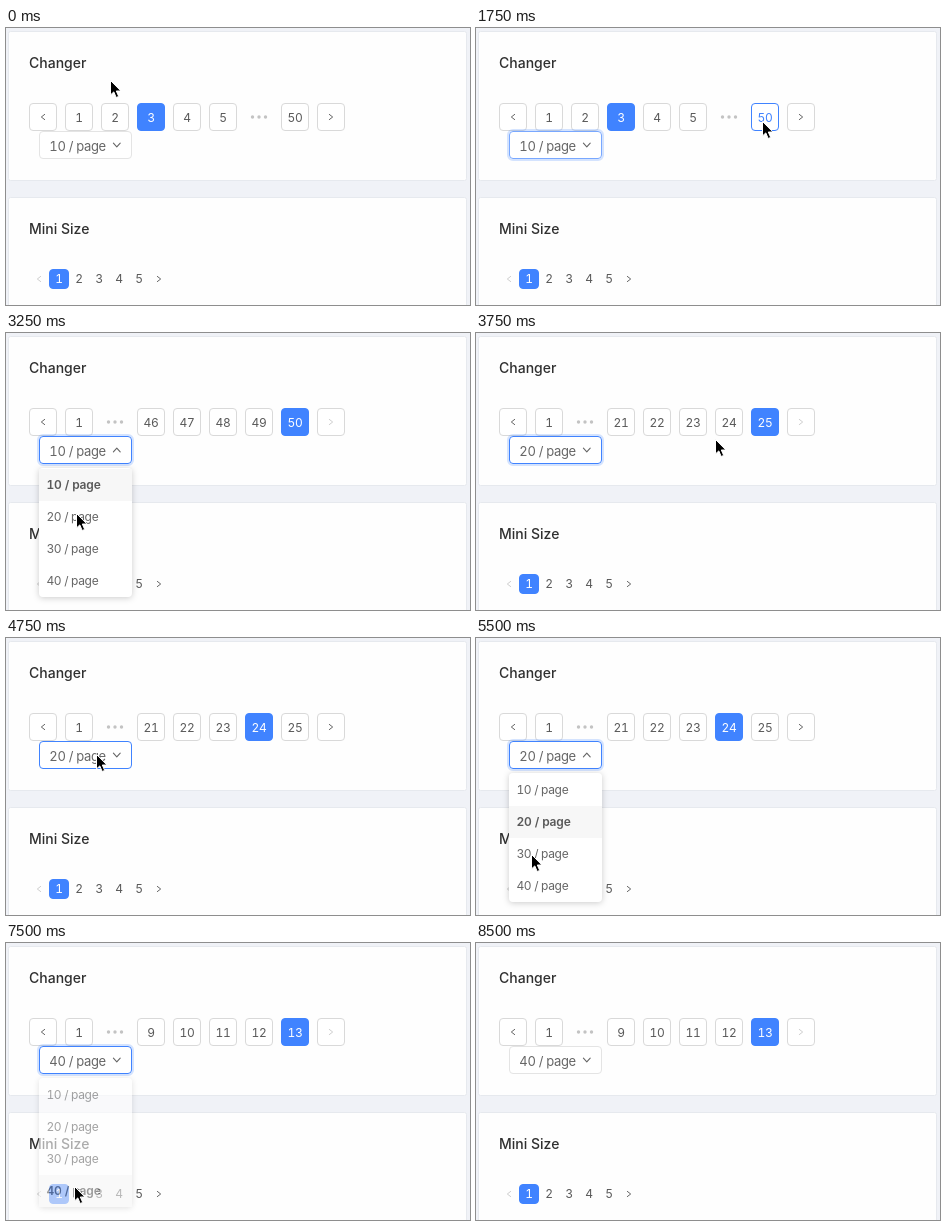
Recreate the animation shown at these times as an HTML page. Size 464x277 px, loop 9 s.

```html
<!DOCTYPE html>
<html lang="en">
<head>
<meta charset="utf-8">
<title>Pagination</title>
<style>
  html, body { margin: 0; width: 100%; height: 100%; overflow: hidden; background: #f0f2f7; }
  svg {
    display: block; width: 464px; height: 277px; fill: #595959;
    font: 12px Inter, "Open Sans", sans-serif; font-variant-numeric: tabular-nums;
  }
  .card { fill: #fefefe; stroke: #e6e9ee; }
  .title { font-size: 14px; font-weight: 500; fill: #303030; }
  .mid { text-anchor: middle; letter-spacing: -.2px; }
  .size { letter-spacing: -.33px; fill: #666; }
  .picked { letter-spacing: -.15px; font-weight: 600; }
  .line { fill: none; stroke-linecap: round; stroke-linejoin: round; }
  .shadow { filter: drop-shadow(0 1px 3px rgba(0, 0, 0, .2)); }
</style>
</head>
<body>
<svg viewBox="0 0 464 277">
  <rect class="card" x="2.5" y="3.5" width="458" height="149" rx="2"/>
  <rect class="card" x="2.5" y="169.5" width="458" height="120" rx="2"/>
  <text class="title" x="23" y="40">Changer</text>
  <text class="title" x="23" y="206">Mini Size</text>
  <g id="mini"></g>
  <g id="pager"></g>
  <g id="select"></g>
  <g id="menu"></g>
  <path id="cursor" d="M0 0V14.4L3.3 11.4L5.7 17L8.2 15.9L5.8 10.5H10.4Z" fill="#000" stroke="#fff" stroke-width="1"/>
</svg>
<script>
const LOOP = 9000, STEP = 250, LAST = 34, TOTAL = 500;
const BLUE = '#4083ff', GREY = '#d9d9d9';
const SIZES = [10, 20, 30, 40];
const $ = id => document.getElementById(id);

// Pointer keys: step, x, y; straight moves between them
const PATH = [
  [0, 104, 52], [3, 92, 114], [4, 110, 115], [5, 183, 108], [6, 245, 106],
  [7, 286, 93], [8, 286, 93], [10, 93, 118], [11, 93, 118], [13, 70, 180],
  [15, 239, 106], [16, 250, 92], [17, 250, 92], [19, 90, 116], [20, 88, 117],
  [21, 70, 180], [22, 55, 216], [23, 55, 216], [25, 90, 117], [26, 90, 117],
  [27, 83, 150], [29, 68, 243], [30, 68, 243], [33, 231, 130]
];

// State changes, applied in order
const EVENTS = [
  [0, { page: 3, size: 10, focus: 0, open: 0 }],
  [4, { focus: 1 }],
  [7, { focus: .7 }],
  [8, { page: 50, focus: 0 }],
  [11, { focus: 1, open: 1 }],
  [14, { size: 20, open: 0 }],
  [17, { page: 24, focus: 0 }],
  [20, { focus: 1, open: 1 }],
  [23, { size: 30, open: .6 }],
  [24, { open: 0 }],
  [26, { open: 1 }],
  [30, { size: 40, open: .6 }],
  [31, { open: 0 }],
  [34, { focus: 0 }]
];

function pointerAt(step) {
  const i = PATH.findIndex(k => k[0] >= step);
  if (i < 0) return null;
  const b = PATH[i], a = PATH[Math.max(0, i - 1)];
  const f = b === a ? 0 : (step - a[0]) / (b[0] - a[0]);
  return { x: a[1] + (b[1] - a[1]) * f, y: a[2] + (b[2] - a[2]) * f };
}

const inside = (p, x, y, w, h) => p && p.x >= x && p.x < x + w && p.y >= y && p.y < y + h;
const label = (s, x, y, attrs = '') => `<text x="${x}" y="${y}" ${attrs}>${s}</text>`;
const box = (x, y, w, h, fill, stroke) =>
  `<rect x="${x + .5}" y="${y + .5}" width="${w - 1}" height="${h - 1}" rx="3.5" fill="${fill}" stroke="${stroke}"/>`;
const arrow = (x, y, dir, color) =>
  `<path class="line" d="M${x - 1.7 * dir} ${y - 2.6}L${x + 1.7 * dir} ${y}L${x - 1.7 * dir} ${y + 2.6}" stroke="${color}"/>`;

function drawMini() {
  let out = arrow(33, 251, -1, '#cfcfcf') + arrow(153, 251, 1, '#666') + box(43, 241, 20, 20, BLUE, BLUE);
  for (let n = 1; n <= 5; n++)
    out += label(n, 33 + 20 * n, 255.3, `class="mid"${n === 1 ? ' fill="#fff"' : ''}`);
  return out;
}

function drawPager(page, count, p) {
  const tail = [0, 1, 2, 3, 4].map(i => count - 4 + i);
  const items = page <= 3 ? ['<', 1, 2, 3, 4, 5, '...', count, '>'] : ['<', 1, '...', ...tail, '>'];
  return items.map((item, i) => {
    const x = 23 + 36 * i, mid = x + 14;
    if (item === '...')
      return [-6.5, 0, 6.5].map(d => `<circle cx="${mid + d}" cy="89" r="1.7" fill="#c3c3c3"/>`).join('');
    const off = item === '>' && page === count;
    const hot = !off && inside(p, x, 75, 28, 28);
    const active = item === page;
    const frame = box(x, 75, 28, 28, active ? BLUE : '#fff', active || hot ? BLUE : GREY);
    if (item === '<' || item === '>')
      return frame + arrow(mid, 89, item === '<' ? -1 : 1, off ? '#cfcfcf' : hot ? BLUE : '#666');
    return frame + label(item, mid, 93.7, `class="mid" fill="${active ? '#fff' : hot ? BLUE : '#595959'}"`);
  }).join('');
}

function drawSelect(s, p) {
  const hot = inside(p, 33, 103, 93, 28);
  const glow = s.focus ? `<rect x="32" y="102" width="95" height="30" rx="5" fill="none" stroke="${BLUE}" stroke-opacity=".22" stroke-width="2"/>` : '';
  const edge = hot || s.focus === 1 ? BLUE : s.focus ? '#79a8ff' : '#e4e4e4';
  const d = s.open === 1 ? -1.9 : 1.9;
  return glow + box(33, 103, 93, 28, '#fff', edge) +
    label(s.size + ' / page', 43.3, 122.7, 'class="size" font-size="13"') +
    `<path class="line" d="M107.4 ${117 - d}L110.8 ${117 + d}L114.2 ${117 - d}" stroke="#666" stroke-width="1.1"/>`;
}

function drawMenu(size) {
  return '<rect class="shadow" x="33" y="135" width="93" height="129" rx="4" fill="#fff"/>' +
    SIZES.map((n, i) => {
      const y = 136 + 32 * i, on = n === size;
      return (on ? `<rect x="33" y="${y}" width="93" height="32" fill="#f7f7f7"/>` : '') +
        label(n + ' / page', 40.4, y + 20.2, `class="${on ? 'picked' : 'size'}"`);
    }).join('');
}

function render(step) {
  const s = {};
  for (const [at, change] of EVENTS) if (at <= step) Object.assign(s, change);
  const count = Math.ceil(TOTAL / s.size);
  const p = pointerAt(step);
  $('pager').innerHTML = drawPager(Math.min(s.page, count), count, p);
  $('select').innerHTML = drawSelect(s, p);
  $('menu').innerHTML = s.open ? drawMenu(s.size) : '';
  $('menu').setAttribute('opacity', s.open);
  $('cursor').setAttribute('visibility', p ? 'visible' : 'hidden');
  if (p) $('cursor').setAttribute('transform', `translate(${p.x + .5} ${p.y + .5})`);
}

let shown = -1;
function tick() {
  const step = Math.min(LAST, Math.floor(performance.now() % LOOP / STEP));
  if (step !== shown) render(shown = step);
  requestAnimationFrame(tick);
}

$('mini').innerHTML = drawMini();
tick();
</script>
</body>
</html>
```
